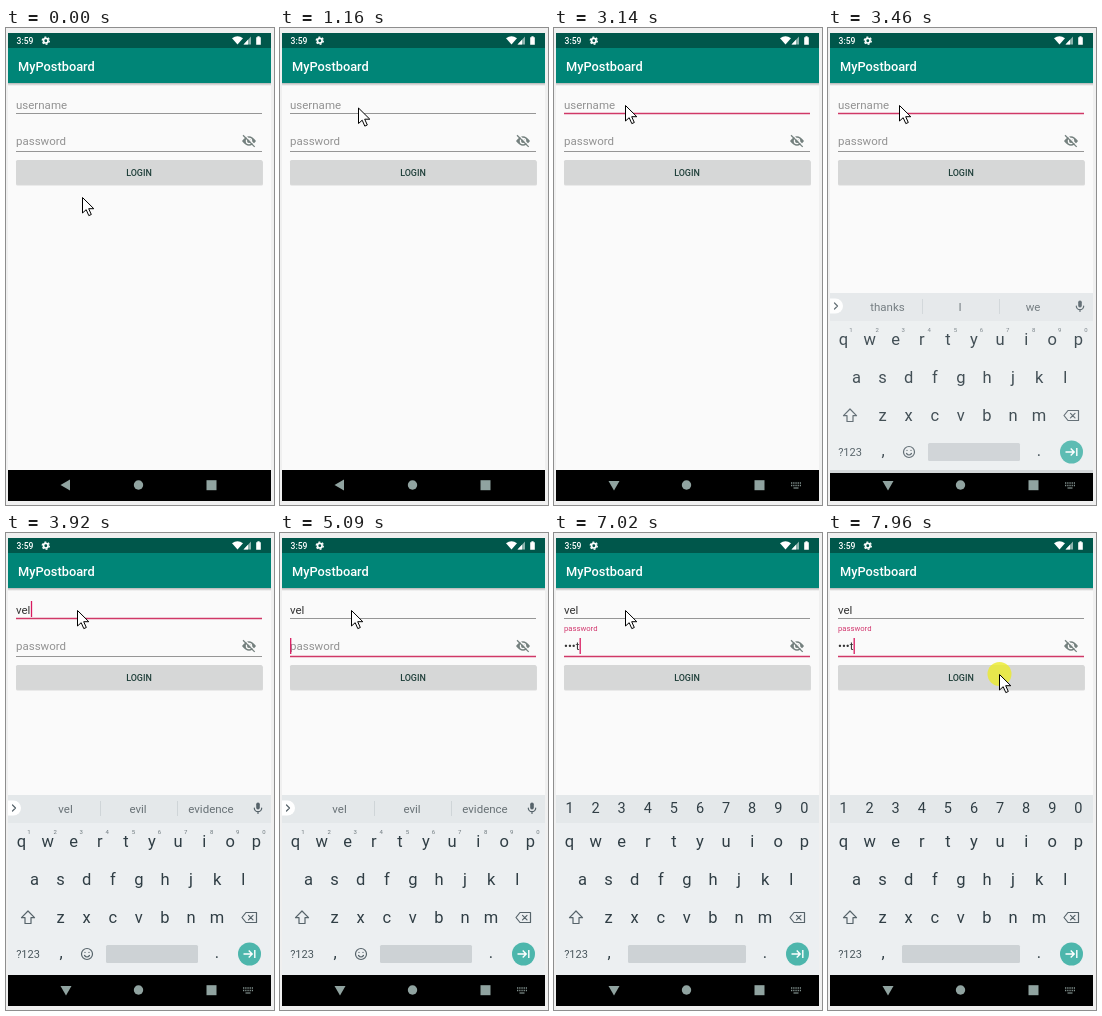
These frames come from a looping animation (268x477 px, 8 s). An HTML page:

```html
<!DOCTYPE html>
<html lang="en">
<head>
<meta charset="utf-8">
<title>Login screen</title>
<style>
  html, body { margin: 0; width: 100%; height: 100%; overflow: hidden; background: #f0f0f0; }
  svg { display: block; width: 268px; height: 477px; }
  text { font-family: Roboto, "Noto Sans", sans-serif; }
  .field { font-size: 11.5px; fill: #333; }
  .hint { fill: #929292; }
  .float { font-size: 7.7px; fill: #d2386f; }
  .line { stroke: #969696; stroke-width: 1; }
  .active { stroke: #d03867; stroke-width: 1.3; }
  .caret { stroke: #d81b60; stroke-width: 1.3; }
  .key { font-size: 16.5px; fill: #303e45; text-anchor: middle; }
  .digit { font-size: 14.5px; }
  .mini { font-size: 6px; fill: #6d787d; text-anchor: middle; }
  .word { font-size: 11.5px; fill: #687176; text-anchor: middle; }
  .mode { font-size: 11px; fill: #4a575d; text-anchor: middle; }
  .icon { fill: none; stroke: #56636a; stroke-width: 1.2; stroke-linejoin: round; stroke-linecap: round; }
</style>
</head>
<body>
<svg viewBox="0 0 268 477">
  <defs>
    <linearGradient id="shade" x1="0" y1="0" x2="0" y2="1">
      <stop offset="0" stop-color="#000" stop-opacity=".28"/>
      <stop offset="1" stop-color="#000" stop-opacity="0"/>
    </linearGradient>
  </defs>

  <!-- app -->
  <rect width="268" height="477" fill="#f0f0f0"/>
  <rect x="2" y="5" width="263" height="437" fill="#fafafa"/>
  <rect x="2" y="55" width="263" height="3" fill="url(#shade)"/>
  <rect x="2" y="20" width="263" height="35" fill="#008577"/>
  <rect x="2" y="5" width="263" height="15" fill="#00574b"/>
  <text x="10.5" y="16" font-size="8.6" font-weight="500" fill="#fff">3:59</text>
  <circle cx="39.8" cy="12.7" r="2.3" fill="none" stroke="#fff" stroke-width="1.7"/>
  <circle cx="39.8" cy="12.7" r="3.6" fill="none" stroke="#fff" stroke-width="1.2" stroke-dasharray="1.9 1.87"/>
  <g fill="#fff">
    <path d="M226 10.2Q231.500 6.300 237 10.200L231.500 16.500Z"/>
    <path d="M245 8.500V16.500H237.500Z" opacity=".55"/>
    <path d="M242 11.700V16.500H237.500Z"/>
    <path d="M250.200 9.300H251.400V8.300H253.600V9.300H254.800V16.800H250.200Z"/>
  </g>
  <text x="12" y="42.500" font-size="12.8" font-weight="500" fill="#fff">MyPostboard</text>

  <!-- user name -->
  <path class="line" d="M10 85.500H256" data-on="0-2050 5090-8000"/>
  <path class="line active" d="M10 85.500H256" data-on="2050-5090"/>
  <text class="field hint" x="10" y="80.500" data-on="0-3540">username</text>
  <text class="field" x="10" y="80.500" data-on="3540-3610">v</text>
  <text class="field" x="10" y="80.500" data-on="3610-3920">ve</text>
  <text class="field" x="10" y="80.500" data-on="3920-8000">vel</text>
  <path class="caret" d="M10.700 68V84" data-on="2050-2980"/>
  <path class="caret" d="M16.500 68V84" data-on="3540-3610"/>
  <path class="caret" d="M22.500 68V84" data-on="3610-3920"/>
  <path class="caret" d="M25.500 68V84" data-on="3920-5090"/>

  <!-- password -->
  <path class="line" d="M10 123.500H256" data-on="0-5090"/>
  <path class="line active" d="M10 123.500H256" data-on="5090-8000"/>
  <text class="field hint" x="10" y="117" data-on="0-5550">password</text>
  <text class="float" x="10" y="98" data-on="5550-8000">password</text>
  <text class="field" x="10" y="117" data-on="6640-6790">e</text>
  <text class="field" x="10" y="117" data-on="6790-7020">••e</text>
  <text class="field" x="10" y="117" data-on="7020-8000">•••t</text>
  <path class="caret" d="M10.700 105V121" data-on="5090-6090 6260-6640"/>
  <path class="caret" d="M16 105V121" data-on="6640-6790"/>
  <path class="caret" d="M24.800 105V121" data-on="6790-7020"/>
  <path class="caret" d="M26.200 105V121" data-on="7020-7330 7790-8000"/>
  <g>
    <path d="M236 113Q243 103.500 250 113Q243 122.500 236 113Z" fill="#74807e"/>
    <circle cx="243" cy="113" r="2.600" fill="#74807e" stroke="#fafafa" stroke-width="1.300"/>
    <path d="M238 106.300L249.500 117.800" stroke="#fafafa" stroke-width="1.300"/>
    <path d="M237 107.200L248.700 118.900" stroke="#74807e" stroke-width="1.300"/>
  </g>

  <!-- button -->
  <rect x="10" y="133" width="247" height="24.500" rx="1.500" fill="#000" opacity=".13"/>
  <rect x="10" y="132" width="246.500" height="24.500" rx="1.500" fill="#d6d7d7"/>
  <text x="133" y="147.500" font-size="8.96" font-weight="500" fill="#20403b" text-anchor="middle">LOGIN</text>

  <!-- navigation -->
  <rect x="2" y="442" width="263" height="31" fill="#000"/>
  <g fill="#90a3a0">
    <path d="M54.500 457L64 451.500V462.500Z" data-on="0-3060"/>
    <path d="M54.500 453H65.500L60 462.500Z" data-on="3060-8000"/>
    <circle cx="132.500" cy="457" r="4.700"/>
    <rect x="200.500" y="452.200" width="10" height="10"/>
    <g data-on="3060-8000" fill="none" stroke="#80908d">
      <path d="M237 455H247M237 457.500H247" stroke-width="1.300" stroke-dasharray="1.300 .9"/>
      <path d="M239.500 460H244.500" stroke-width="1.200"/>
    </g>
  </g>

  <!-- keyboard -->
  <g id="board" data-on="3380-8000">
    <rect x="2" y="262" width="263" height="180" fill="#eceff1"/>
    <rect x="2" y="262" width="263" height="28" fill="#e4e8ea"/>
    <g id="keys"></g>
    <g data-on="3380-6010">
      <path d="M2 267.500H7.500A7.500 7.500 0 0 1 7.500 282.500H2Z" fill="#fff"/>
      <path class="icon" d="M6.500 272L9.500 275L6.500 278"/>
      <path d="M94.500 268V283M171.500 268V283" stroke="#cfd5d8"/>
      <g data-on="3380-3920">
        <text class="word" x="59.500" y="280">thanks</text>
        <text class="word" x="132" y="280">I</text>
        <text class="word" x="205" y="280">we</text>
      </g>
      <g data-on="3920-6010">
        <text class="word" x="59.500" y="280">vel</text>
        <text class="word" x="132" y="280">evil</text>
        <text class="word" x="205" y="280">evidence</text>
      </g>
      <rect x="250.200" y="269.500" width="3.600" height="7" rx="1.800" fill="#56636a"/>
      <path class="icon" d="M248.300 275A3.700 3.700 0 0 0 255.700 275M252 279V280.500"/>
      <circle class="icon" cx="81" cy="421" r="5.500"/>
      <path class="icon" d="M78.500 422.500Q81 425.500 83.500 422.500M79 419.300V419.400M83 419.300V419.400"/>
      <rect x="100" y="412" width="92" height="18" rx="1.500" fill="#cdd2d5"/>
    </g>
    <rect x="74" y="412" width="118" height="18" rx="1.500" fill="#cdd2d5" data-on="6010-8000"/>
    <path class="icon" d="M22 378L28.500 384.700H25V390.500H19V384.700H15.500Z"/>
    <path class="icon" d="M236 384.500L240 379.500H250.500V389.500H240ZM242.500 382.300L247 386.800M247 382.300L242.500 386.800"/>
    <text class="mode" x="22" y="424.500">?123</text>
    <text class="key" x="55" y="425">,</text>
    <text class="key" x="211" y="425">.</text>
    <circle cx="243.500" cy="421" r="11.500" fill="#4db6ac"/>
    <path d="M237.500 421H246M242.700 417.500L246.200 421L242.700 424.500M248.800 417V425" fill="none" stroke="#fff" stroke-width="1.400"/>
  </g>

  <!-- pointer -->
  <g id="pointer">
    <circle r="12" fill="#ecec25" opacity=".78" data-on="7870-8000"/>
    <path d="M0 .5V16L3.700 12.700L6.300 18.600L8.800 17.500L6.200 11.700H11.300Z" fill="#fff" stroke="#000" stroke-width="1"/>
  </g>
</svg>
<script>
const LOOP = 8000, STEP = 26.1;
const $ = id => document.getElementById(id);

function label(text, x, y, cls, on) {
  const el = document.createElementNS("http://www.w3.org/2000/svg", "text");
  el.setAttribute("class", cls);
  el.setAttribute("x", x);
  el.setAttribute("y", y);
  if (on) el.dataset.on = on;
  el.textContent = text;
  $("keys").append(el);
}
function row(chars, x, y, cls, on) {
  [...chars].forEach((c, i) => label(c, x + i * STEP, y, cls, on));
}
row("qwertyuiop", 15.5, 313.5, "key");
row("asdfghjkl", 28.5, 351.5, "key");
row("zxcvbnm", 54.5, 389.5, "key");
row("1234567890", 23, 301, "mini", "3380-6010");
row("1234567890", 15.5, 280.3, "key digit", "6010-8000");

const timed = [...document.querySelectorAll("[data-on]")].map(el => ({
  el, spans: el.dataset.on.split(" ").map(s => s.split("-").map(Number))
}));

// time, x, y
const pointerSteps = [
  [0, 76.5, 169], [70, 92, 108],
  [370, 87, 98], [440, 82, 88], [500, 79.5, 80.5],
  [1160, 78.5, 79.5], [1260, 77.5, 78.5], [1350, 76.5, 77], [1440, 75.8, 76],
  [2450, 73, 76.5], [2520, 71.5, 77],
  [7330, 98, 92], [7410, 135, 113], [7490, 162, 130], [7560, 177, 139],
  [7790, 175, 140], [7870, 172.5, 141], [7960, 171.5, 141]
];
// time, offset, opacity
const boardSteps = [[0, 24, 0.6], [3460, 3, 0.9], [3540, 0, 1]];
const at = (steps, t) => steps.filter(s => s[0] <= t).pop();

function draw(t) {
  for (const { el, spans } of timed)
    el.style.display = spans.some(([a, b]) => t >= a && t < b) ? "" : "none";
  const [, x, y] = at(pointerSteps, t);
  $("pointer").setAttribute("transform", `translate(${x} ${y})`);
  const [, dy, alpha] = at(boardSteps, t);
  $("board").setAttribute("transform", `translate(0 ${dy})`);
  $("board").setAttribute("opacity", alpha);
}

let start;
function tick(now) {
  start ??= now;
  draw((now - start) % LOOP);
  requestAnimationFrame(tick);
}
draw(0);
requestAnimationFrame(tick);
</script>
</body>
</html>
```
